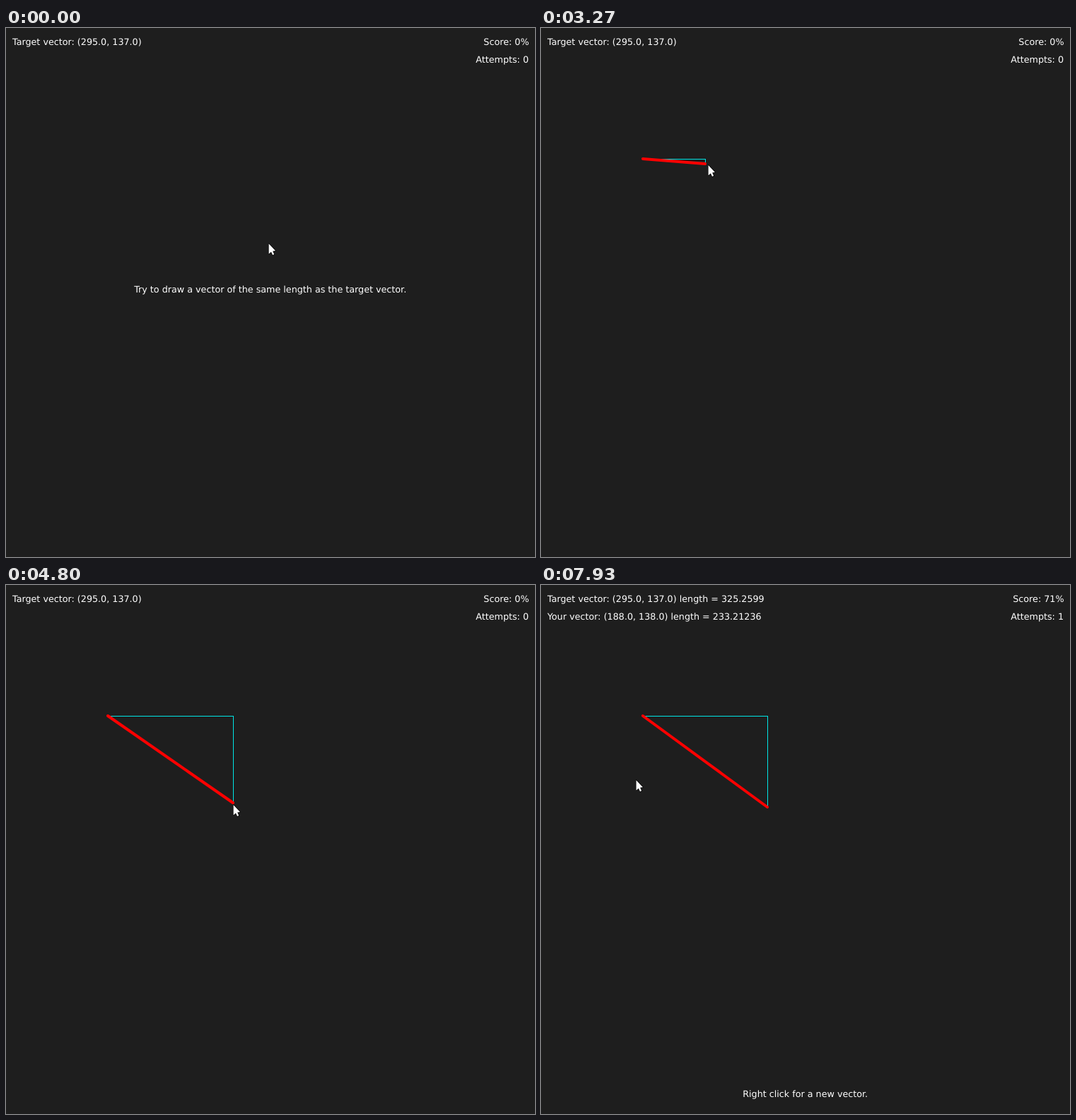
These frames come from a looping animation (748 px wide and 748 px high, 8 s). An HTML page:

```html
<!DOCTYPE html>
<html lang="en">
<head>
<meta charset="utf-8">
<title>Vector game</title>
<style>
  html, body { margin: 0; width: 100%; height: 100%; overflow: hidden; background: #1e1e1e; }
  svg { display: block; width: 100vw; height: 100vh; }
  text { font: 12.72px "DejaVu Sans", Verdana, sans-serif; fill: #fff; text-rendering: geometricPrecision; }
  .right { text-anchor: end; }
  .mid { text-anchor: middle; }
  .leg { stroke: #00e6e6; stroke-width: 1; shape-rendering: crispEdges; }
  #arm { stroke: #f00; stroke-width: 4; stroke-linecap: round; }
  #cursor { fill: #fff; stroke: #000; stroke-width: 1.4; paint-order: stroke; stroke-linejoin: round; }
</style>
</head>
<body>
<svg viewBox="0 0 748 748">
  <text id="goal" x="9" y="24"></text>
  <text id="yours" x="9" y="48.5">Your vector: (188.0, 138.0) length = 233.21236</text>
  <text id="score" class="right" x="739.5" y="24"></text>
  <text id="tries" class="right" x="739" y="48.5"></text>
  <text id="hint" class="mid" x="373.7" y="374">Try to draw a vector of the same length as the target vector.</text>
  <text id="again" class="mid" x="373.7" y="724">Right click for a new vector.</text>
  <g id="drawing">
    <line id="across" class="leg"/>
    <line id="down" class="leg"/>
    <line id="arm"/>
  </g>
  <path id="cursor" d="M.6 1V15.4L3.9 12.4L6 17L8.2 16L6.2 11.4L10 11.1Z"/>
</svg>
<script>
const LOOP = 8000, TICK = 1000 / 15, LAST = 119;
const PRESS = 38, RELEASE = 75, RESULT = 84, LAG = 0.45;
const ORIGIN = [144, 185];

const linear = u => u;
const smooth = u => u * u * (3 - 2 * u);
const easeOut = u => 1 - (1 - u) ** 1.4;

// pointer sweeps, each a quadratic curve that starts where the last one ended
const HOME = [371, 304];
const sweeps = [
  { from: 2, to: 9, bend: [259, 410], end: [147, 304], ease: smooth },
  { from: 12, to: 25, bend: [122, 248], end: [139, 193], ease: easeOut },
  { from: 25, to: 32, bend: [141, 188], end: [145, 185], ease: linear },
  { from: 39, to: 58, bend: [231, 186], end: [319, 211], ease: linear },
  { from: 58, to: RELEASE, bend: [327, 291], end: [320, 314], ease: smooth },
  { from: 105, to: 113, bend: [225, 262], end: [135, 215], ease: smooth },
  { from: 116, to: LAST, bend: [133, 245], end: [134, 275], ease: linear }
];

const el = id => document.getElementById(id);
const show = (id, on) => { el(id).style.display = on ? "" : "none"; };

function pointer(tick) {
  let at = HOME;
  for (const { from, to, bend, end, ease } of sweeps) {
    if (tick <= from) break;
    const s = ease(Math.min(1, (tick - from) / (to - from)));
    at = at.map((v, i) => (1 - s) ** 2 * v + 2 * s * (1 - s) * bend[i] + s * s * end[i]);
  }
  return at.map(Math.round);
}

function setLine(id, [x1, y1], [x2, y2], shift = 0) {
  const ends = { x1, y1, x2, y2 };
  for (const key in ends) el(id).setAttribute(key, ends[key] + shift);
}

function render(ms) {
  const tick = Math.min(LAST, Math.floor((ms + 3.4) / TICK));
  const done = tick >= RESULT;

  el("goal").textContent = "Target vector: (295.0, 137.0)" + (done ? " length = 325.2599" : "");
  el("score").textContent = "Score: " + (done ? 71 : 0) + "%";
  el("tries").textContent = "Attempts: " + (done ? 1 : 0);
  show("yours", done);
  show("again", done);
  show("hint", tick < PRESS);
  show("drawing", tick >= PRESS);

  // the drawn vector trails slightly behind the pointer until release
  const tip = pointer(tick < RELEASE ? tick - LAG : RELEASE);
  const corner = [tip[0], ORIGIN[1]];
  setLine("across", ORIGIN, corner, 0.5);
  setLine("down", corner, tip, 0.5);
  setLine("arm", ORIGIN, tip);
  el("cursor").setAttribute("transform", `translate(${pointer(tick)})`);
}

const begin = performance.now();
function loop() {
  render((performance.now() - begin) % LOOP);
  requestAnimationFrame(loop);
}
loop();
</script>
</body>
</html>
```
